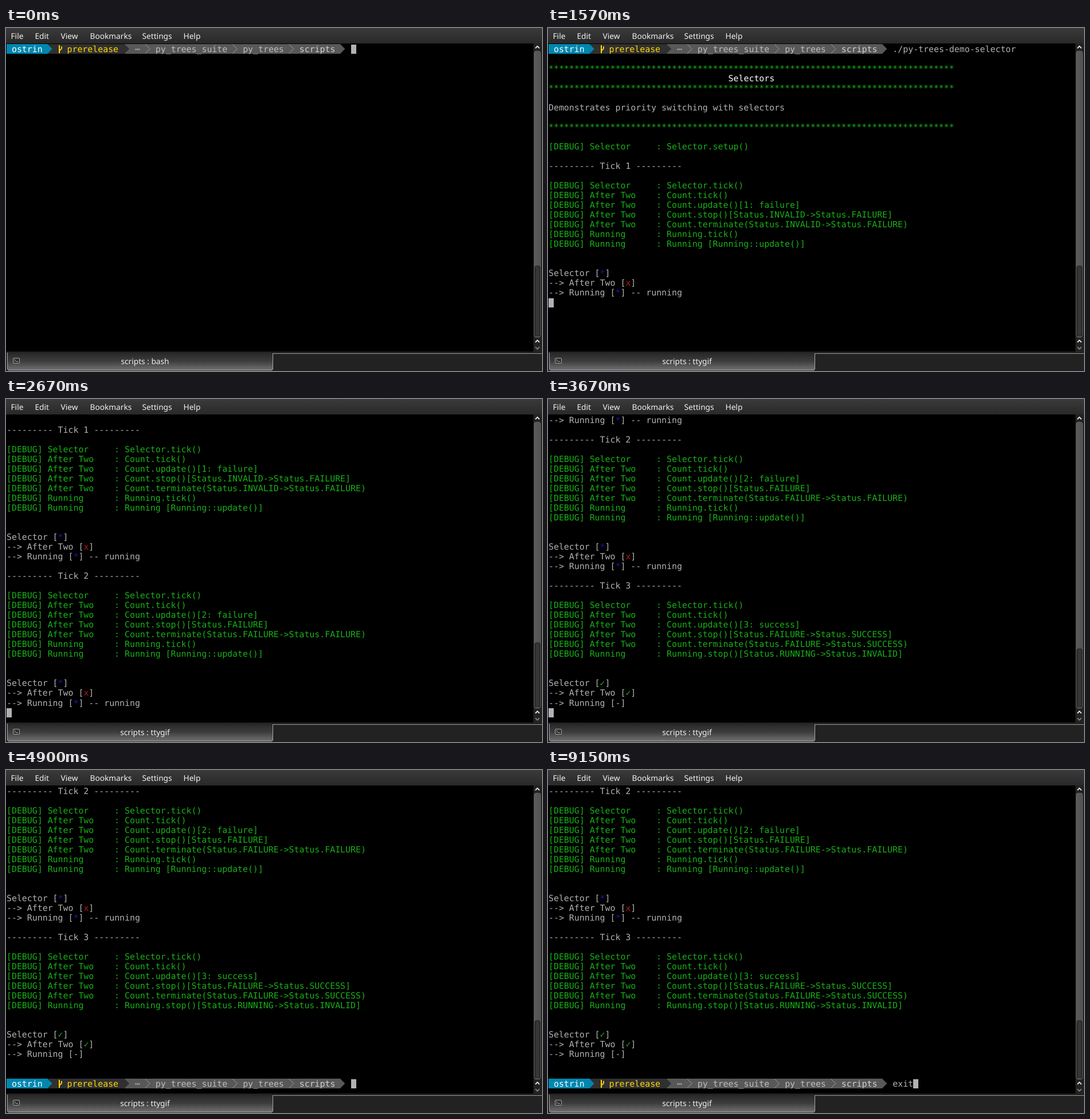
These frames come from a looping animation (935x599 px, 9230 ms). An HTML page with a canvas:

```html
<!DOCTYPE html>
<html lang="en">
<head>
<meta charset="utf-8">
<title>Terminal session</title>
<style>
html, body { margin: 0; width: 100%; height: 100%; overflow: hidden; background: #000; }
canvas { display: block; }
</style>
</head>
<body>
<canvas id="stage" width="935" height="599"></canvas>
<script>
const ctx = document.getElementById('stage').getContext('2d');
const LOOP = 9230, COL = 8.96, ROW = 17.035, LEFT = 1, TOP = 28, ROWS = 31;
const MONO = '14.88px "DejaVu Sans Mono", monospace';
const SANS = '13.7px "Noto Sans", "Open Sans", sans-serif';
const GREY = '#b2b2b2', GREEN = '#18b218';
const MARKUP = { r: '#b21818', g: GREEN, b: '#1818b2', w: '#ffffff' };
const COMMAND = './py-trees-demo-selector';
const PROMPT_COLS = 67;

// Transcript: {r…}, {g…}, {b…}, {w…} mark coloured spans.
const debug = (name, message) => `[DEBUG] ${name.padEnd(12)} : ${message}`;
const stars = '*'.repeat(79);
const tick = (number, result, stopped, change, rest) => [
  '', `--------- Tick ${number} ---------`, '',
  debug('Selector', 'Selector.tick()'),
  debug('After Two', 'Count.tick()'),
  debug('After Two', `Count.update()[${number}: ${result}]`),
  debug('After Two', `Count.stop()[${stopped}]`),
  debug('After Two', `Count.terminate(${change})`),
  ...rest.map(message => debug('Running', message)),
  '', ''
];
const tree = (root, first, second) =>
  [`Selector [${root}]`, `--> After Two [${first}]`, `--> Running [${second}`];
const runningRest = ['Running.tick()', 'Running [Running::update()]'];
const runningTree = tree('{b*}', '{rx}', '{b*}] -- running');
const toFailure = 'Status.INVALID->Status.FAILURE';
const toSuccess = 'Status.FAILURE->Status.SUCCESS';
const lines = [
  '', '', stars, ' '.repeat(35) + '{wSelectors}', stars, '',
  'Demonstrates priority switching with selectors', '', stars, '',
  debug('Selector', 'Selector.setup()'),
  ...tick(1, 'failure', toFailure, toFailure, runningRest), ...runningTree,
  ...tick(2, 'failure', 'Status.FAILURE', 'Status.FAILURE->Status.FAILURE', runningRest), ...runningTree,
  ...tick(3, 'success', toSuccess, toSuccess, ['Running.stop()[Status.RUNNING->Status.INVALID]']),
  ...tree('{g✓}', '{g✓}', '-]')
];
const LAST = lines.length + 2;

// [start ms, line of the cursor, text typed at a prompt on that line]
const steps = [
  [0, 0, ''], [420, 0, '.'], [560, 0, './'],
  [820, 0, './p'], [920, 0, './py-trees-'], [1020, 0, './py-trees-demo-s'], [1120, 0, COMMAND],
  [1340, 1], [1470, 21], [1570, 26], [2570, 36], [2670, 41], [3670, 55],
  [4670, LAST], [4900, LAST, ''],
  [8810, LAST, 'e'], [9000, LAST, 'ex'], [9075, LAST, 'exi'], [9150, LAST, 'exit']
];

const colX = col => LEFT + col * COL;
const rowY = row => TOP + row * ROW;

function rect(x, y, w, h, fill) {
  ctx.fillStyle = fill;
  ctx.fillRect(x, y, w, h);
}

function text(string, x, y, color, font = MONO, align = 'left') {
  ctx.font = font;
  ctx.textAlign = align;
  ctx.fillStyle = color;
  ctx.fillText(string, x, y);
}

function stroke(points, color, width = 1) {
  ctx.beginPath();
  points.forEach(([x, y]) => ctx.lineTo(x, y));
  ctx.strokeStyle = color;
  ctx.lineWidth = width;
  ctx.stroke();
}

function box(x, y, w, h, radius, fill, border) {
  ctx.beginPath();
  ctx.roundRect(x, y, w, h, radius);
  if (fill) { ctx.fillStyle = fill; ctx.fill(); }
  if (border) { ctx.strokeStyle = border; ctx.lineWidth = 1; ctx.stroke(); }
}

function gradient(x0, y0, x1, y1, ...colors) {
  const g = ctx.createLinearGradient(x0, y0, x1, y1);
  colors.forEach((color, i) => g.addColorStop(i / (colors.length - 1), color));
  return g;
}

const cellText = (string, col, row, color) => text(string, colX(col), rowY(row) + 13.5, color);

function drawLine(line, row) {
  const base = /^(\[DEBUG|\*)/.test(line) ? GREEN : GREY;
  let col = 0;
  for (const part of line.split(/(\{.[^}]*\})/)) {
    const marked = part[0] === '{';
    const string = marked ? part.slice(2, -1) : part;
    cellText(string, col, row, marked ? MARKUP[part[1]] : base);
    col += string.length;
  }
}

function drawPrompt(row, typed) {
  const y = Math.round(rowY(row)), h = 17;
  const segment = (from, to, color) => {
    const x = colX(to);
    rect(colX(from), y, x - colX(from), h, color);
    ctx.beginPath();
    ctx.moveTo(x - 0.5, y);
    ctx.lineTo(x + COL - 1, y + h / 2);
    ctx.lineTo(x - 0.5, y + h);
    ctx.fill();
  };
  segment(23, 65, '#585858');
  segment(8, 23, '#303030');
  segment(0, 8, '#0087af');
  cellText('ostrin', 1, row, '#ffffff');
  stroke([[93, y + 2], [93, y + 16]], '#ffd700', 2);
  stroke([[97, y + 4], [97, y + 8], [93, y + 12]], '#ffd700', 1.8);
  text('prerelease', 106.5, rowY(row) + 14.2, '#ffd700');
  cellText('⋯', 25, row, '#bcbcbc');
  cellText('py_trees_suite', 29, row, '#bcbcbc');
  cellText('py_trees', 46, row, '#bcbcbc');
  cellText('scripts', 57, row, '#d0d0d0');
  for (const col of [27, 44, 55]) {
    const x = colX(col);
    stroke([[x, y + 0.5], [x + 8, y + h / 2], [x, y + h - 0.5]], '#9e9e9e');
  }
  cellText(typed, PROMPT_COLS, row, GREY);
}

function drawMenu() {
  rect(0, 0, 935, 27, gradient(0, 0, 0, 27, '#3b3a3a', '#2a2929'));
  const items = { File: 9, Edit: 51, View: 96, Bookmarks: 147, Settings: 238, Help: 310 };
  for (const [label, x] of Object.entries(items)) text(label, x - 0.5, 18.5, '#f2f2f2', SANS);
}

function drawScrollbar(scrolled) {
  rect(920, 27, 15, 538, '#232323');
  box(921.5, 40.5, 11, 499, 3, gradient(921, 0, 933, 0, '#5c5c5c', '#525252'), '#636363');
  const height = 499 * ROWS / (124.75 + scrolled);
  box(922.5, 539.5 - height, 9, height - 0.5, 3, gradient(922, 0, 932, 0, '#2c2c2c', '#393939', '#2c2c2c'), '#1d1d1d');
  stroke([[923, 539.5], [931, 539.5]], '#858585');
  const chevron = (y, dy, color) => stroke([[923.5, y + dy], [927, y - dy], [930.5, y + dy]], color, 1.8);
  chevron(33.5, 1.8, '#f0f0f0');
  chevron(547, 1.8, '#f0f0f0');
  chevron(559, -1.8, '#858585');
}

function drawTabs(title) {
  rect(0, 565, 935, 34, '#222222');
  stroke([[465, 568.5], [935, 568.5]], '#9a9a9a');
  box(2.5, 567.5, 463, 30, [0, 0, 3, 3], gradient(0, 567, 0, 597, '#272727', '#3d3d3d', '#707070'));
  stroke([[2.5, 567], [2.5, 596], [4, 597.5], [464, 597.5], [465.5, 596], [465.5, 568]], '#a8a8a8');
  box(12.5, 576.5, 11, 9, 1.5, '#303030', '#a5a5a5');
  stroke([[14.5, 578.5], [16.5, 580.5], [14.5, 582.5]], '#c0c0c0');
  stroke([[17.5, 582.5], [20.5, 582.5]], '#c0c0c0');
  text(title, 242.5, 587, '#f2f2f2', SANS, 'center');
}

function draw(time) {
  const [, line, typed] = steps.findLast(([start]) => start <= time);
  const scrolled = Math.max(0, line - ROWS + 1);
  const cursorRow = line - scrolled;
  const atPrompt = typed !== undefined;
  rect(0, 0, 935, 599, '#000000');
  lines.slice(scrolled, line).forEach(drawLine);
  if (scrolled === 0) drawPrompt(0, line ? COMMAND : typed);
  if (line === LAST && atPrompt) drawPrompt(cursorRow, typed);
  const cursorCol = atPrompt ? PROMPT_COLS + typed.length : 0;
  rect(Math.round(colX(cursorCol) + 0.2), Math.round(rowY(cursorRow)) + 1, 9, 16, GREY);
  drawMenu();
  drawScrollbar(scrolled);
  drawTabs(time < 820 ? 'scripts : bash' : 'scripts : ttygif');
}

ctx.textRendering = 'geometricPrecision';
const begin = performance.now();
function frame() {
  draw((performance.now() - begin) % LOOP);
  requestAnimationFrame(frame);
}
frame();
</script>
</body>
</html>
```
